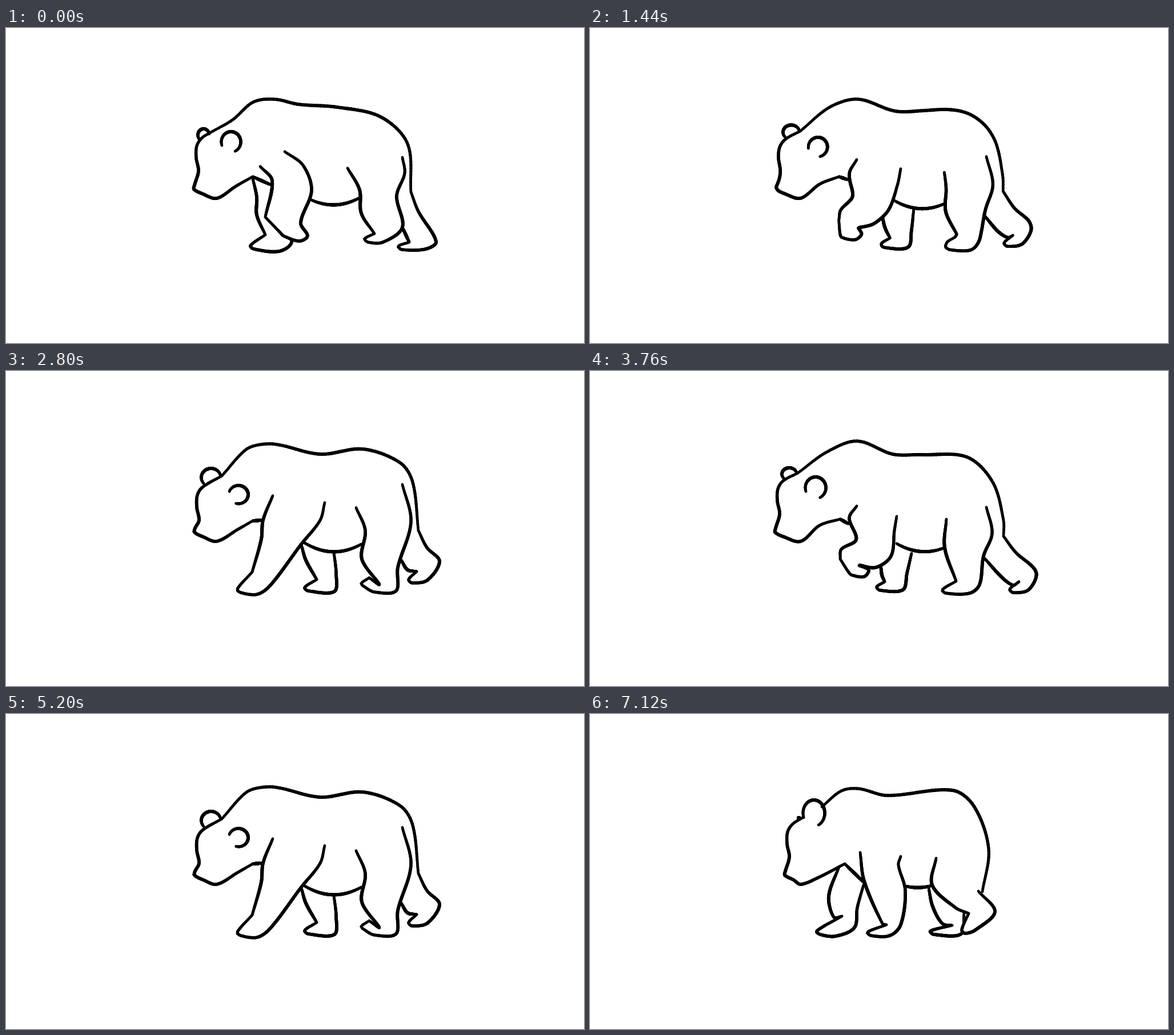
Recreate the animation shown at these times as an HTML page with a canvas. Size 1012 px wide and 553 px high, loop 7.2 s.

```html
<!DOCTYPE html>
<html lang="en">
<head>
<meta charset="utf-8">
<title>Walking bear</title>
<style>
html, body { margin: 0; width: 100%; height: 100%; overflow: hidden; background: #fff; }
canvas { display: block; }
</style>
</head>
<body>
<canvas id="stage" width="1012" height="553"></canvas>
<script>
const ctx = document.getElementById('stage').getContext('2d');
const STEP = 80, STEPS = 15, SAMPLES = 80, GROUND = 390;

// Key poses of the walk. Legs run hip, knee, ankle | toe, heel, back of leg.
// face: shift and dip; ears: centre, radii, turn; belly: both ends.
const poses = [
  {
    at: 0, face: [0, 0], neck: '463,275 432,261 | 402,278', brow: '357,184',
    nearEar: [394, 200, 17, 18], farEar: [346, 188, 10, 11], belly: [535, 302, 621, 297],
    back: '357,184 397,161 433,130 470,125 512,134 580,139 656,156 703,203 709,288',
    farHind: '694,350 706,376 | 687,383 735,388 753,375 722,322 709,288',
    farFore: '432,264 439,297 439,328 454,363 | 428,382 478,392 500,376 490,330',
    nearHind: '598,246 619,284 622,325 645,361 | 628,370 660,376 694,350 684,295 698,255 694,227',
    nearFore: '445,243 466,268 454,332 | 480,359 514,374 528,365 516,342 535,285 520,241 488,217'
  },
  {
    at: 2, face: [-5, 0], neck: '452,268 438,260 | 402,271', brow: '364,179',
    nearEar: [395, 205, 18, 19], farEar: [349, 181, 13, 11], belly: [537, 303, 621, 310],
    back: '364,179 415,142 468,123 530,146 580,147 660,151 705,195 724,262 724,290',
    farHind: '690,328 722,363 741,376 751,370 | 735,383 768,384 781,353 745,318 724,290',
    farFore: '509,340 511,358 516,370 | 502,379 548,384 555,355 563,320',
    nearHind: '624,260 621,310 641,369 | 617,384 665,390 682,375 689,325 704,285 694,239',
    nearFore: '467,237 454,258 466,296 440,313 438,330 | 452,352 480,361 488,349 471,341 500,345 527,325 533,280 537,255'
  },
  {
    at: 5, face: [1, 11], neck: '447,262 432,263 | 406,278', brow: '378,184',
    nearEar: [407, 217, 17, 16, 40], farEar: [359, 187, 17, 16], belly: [520, 300, 622, 304],
    back: '378,184 420,138 446,129 475,129 550,146 625,137 690,161 712,195 722,280',
    farHind: '692,332 703,349 719,352 | 705,366 738,367 759,334 737,310 722,280',
    farFore: '517,305 525,332 544,366 | 523,380 575,387 578,355 574,318',
    nearHind: '613,240 629,280 623,330 654,375 636,363 | 622,373 645,388 683,386 686,345 709,265 694,199',
    nearFore: '467,219 450,262 447,295 431,353 | 405,383 440,392 463,376 517,304 550,262 558,231'
  },
  {
    at: 9, face: [0, 5], neck: '455,258 435,257 | 408,277', brow: '371,178',
    nearEar: [397, 204, 18, 18], farEar: [357, 180, 11, 12], belly: [517, 303, 622, 299],
    back: '371,178 423,145 452,131 497,132 550,147 630,143 685,175 705,230 686,294',
    farHind: '580,317 570,350 568,375 | 552,382 608,390 617,365 632,322',
    farFore: '459,294 444,315 448,336 | 458,345 480,350 490,320',
    nearHind: '598,213 619,250 627,305 656,342 674,369 687,371 | 659,383 708,388 717,350 686,294',
    nearFore: '469,200 456,250 468,306 460,358 473,361 | 439,379 480,390 505,373 517,303 514,270 526,247'
  },
  {
    at: 12, face: [12, 0], neck: '481,298 446,262 | 405,283', brow: '380,175',
    nearEar: [395, 185, 18, 22], farEar: [359, 184, 7, 7], belly: [556, 304, 620, 297],
    back: '406,163 458,128 535,142 590,136 640,152 683,188 694,240 689,301',
    farHind: '600,308 590,335 599,363 613,367 | 576,377 625,385 631,355 637,319',
    farFore: '430,272 397,334 380,353 | 378,377 398,392 411,374 415,361 440,347 474,322 481,300',
    nearHind: '614,268 637,320 693,361 | 671,384 705,389 732,363 690,303',
    nearFore: '472,242 480,292 507,367 | 485,381 535,389 550,370 556,305 533,261'
  },
  {
    at: 14, face: [12, 0], neck: '482,298 446,263 | 400,287', brow: '374,181',
    nearEar: [392, 174, 19, 23], farEar: [366, 183, 1, 1], belly: [552, 302, 599, 301],
    back: '406,163 440,135 470,131 520,143 635,134 673,163 698,237 687,312',
    farHind: '593,306 600,338 617,368 634,371 | 596,381 650,386 655,350',
    farFore: '436,268 418,320 427,357 441,355 | 397,381 430,390 463,375 468,340 479,300',
    nearHind: '606,253 599,300 640,340 663,350 | 651,379 675,379 709,347 680,311',
    nearFore: '473,243 480,293 512,368 519,370 | 486,383 525,389 544,370 552,310 540,265 544,250'
  }
];

const lerp = (a, b, u) => a.map((v, i) => v + (b[i] - v) * u);
const dist = (a, b) => Math.hypot(b[0] - a[0], b[1] - a[1]);
const points = text => text.trim().split(' ').map(p => p.split(',').map(Number));
const trace = fn => Array.from({ length: SAMPLES + 1 }, (_, i) => fn(i / SAMPLES));

// Chord-length spline, sampled at even distances.
function curve(pts) {
  const tangent = i => {
    const a = pts[Math.max(i - 1, 0)], p = pts[i], b = pts[Math.min(i + 1, pts.length - 1)];
    const span = dist(a, p) + dist(p, b);
    return [(b[0] - a[0]) / span, (b[1] - a[1]) / span];
  };
  const fine = [pts[0]], len = [0];
  for (let i = 0; i + 1 < pts.length; i++) {
    const a = pts[i], b = pts[i + 1], d = dist(a, b), m = tangent(i), n = tangent(i + 1);
    for (let k = 1; k <= 16; k++) {
      const u = k / 16, v = 1 - u;
      const p = [0, 1].map(c => a[c] * v * v * (1 + 2 * u) + b[c] * u * u * (3 - 2 * u)
        + d * u * v * (v * m[c] - u * n[c]));
      len.push(len[len.length - 1] + dist(fine[fine.length - 1], p));
      fine.push(p);
    }
  }
  let i = 0;
  return trace(u => {
    const s = u * len[len.length - 1];
    while (i < fine.length - 2 && len[i + 1] < s) i++;
    return lerp(fine[i], fine[i + 1], (s - len[i]) / (len[i + 1] - len[i]));
  });
}

function leg(text) {
  const [front, rear] = text.split('|').map(points);
  const [x, y] = rear[0];
  rear.splice(1, 0, [x + 6, Math.min(y + 6, GROUND)]);
  return [curve(front), curve([front[front.length - 1], ...rear])];
}

function ear([x, y, rx, ry, turn = 0], from, to) {
  return [trace(u => {
    const a = (from + turn + (to - from) * u) * Math.PI / 180;
    return [x + rx * Math.cos(a), y + ry * Math.sin(a)];
  })];
}

function belly([x0, y0, x1, y1]) {
  const sag = (x1 - x0) ** 2 / 680;
  return [trace(u => [x0 + (x1 - x0) * u, y0 + (y1 - y0) * u + 4 * sag * u * (1 - u)])];
}

function head({ face: [dx, dy], neck, brow }) {
  const [throat, jaw] = neck.split('|').map(points);
  const muzzle = points('344,291 329,283 330,276').map(([x, y]) => [x + dx, y]);
  const forehead = points('337,251 333,228 334,207 343,193').map(([x, y]) => [x + dx, y + dy]);
  return [
    curve(throat),
    curve([throat[1], ...jaw, [369, 299], ...muzzle, ...forehead, ...points(brow)])
  ];
}

// Back to front; near legs hide what lies behind them.
const FIRST_SOLID = 2, LAST_SOLID = 3;
const bodies = poses.map(p => [
  leg(p.farHind), leg(p.farFore), leg(p.nearHind), leg(p.nearFore),
  belly(p.belly), [curve(points(p.back))],
  ear(p.farEar, 140, 350), ear(p.nearEar, 160, 425), head(p)
]);

function fill(pts) {
  ctx.beginPath();
  for (const [x, y] of pts) ctx.lineTo(x, y);
  ctx.fill();
}

// The pen swells towards the middle of each line.
function ink(pts) {
  for (let i = 1; i < pts.length; i++) {
    ctx.lineWidth = 4.6 + 1.3 * Math.sin(Math.PI * i / pts.length);
    ctx.beginPath();
    ctx.moveTo(...pts[i - 1]);
    ctx.lineTo(...pts[i]);
    ctx.stroke();
  }
}

function draw(step) {
  let k = 0;
  while (k < poses.length - 2 && poses[k + 1].at <= step) k++;
  const u = (step - poses[k].at) / (poses[k + 1].at - poses[k].at);
  ctx.fillStyle = '#fff';
  ctx.strokeStyle = '#000';
  ctx.lineCap = 'round';
  ctx.fillRect(0, 0, 1012, 553);
  bodies[k].forEach((part, n) => {
    const next = bodies[k + 1][n];
    const lines = part.map((line, j) => line.map((p, i) => lerp(p, next[j][i], u)));
    if (n >= FIRST_SOLID && n <= LAST_SOLID) fill(lines.flat());
    lines.forEach(ink);
  });
}

const start = performance.now();
let shown = -1;
function tick() {
  const step = Math.floor((performance.now() - start) / STEP) % STEPS;
  if (step !== shown) draw(shown = step);
  requestAnimationFrame(tick);
}
tick();
</script>
</body>
</html>
```
